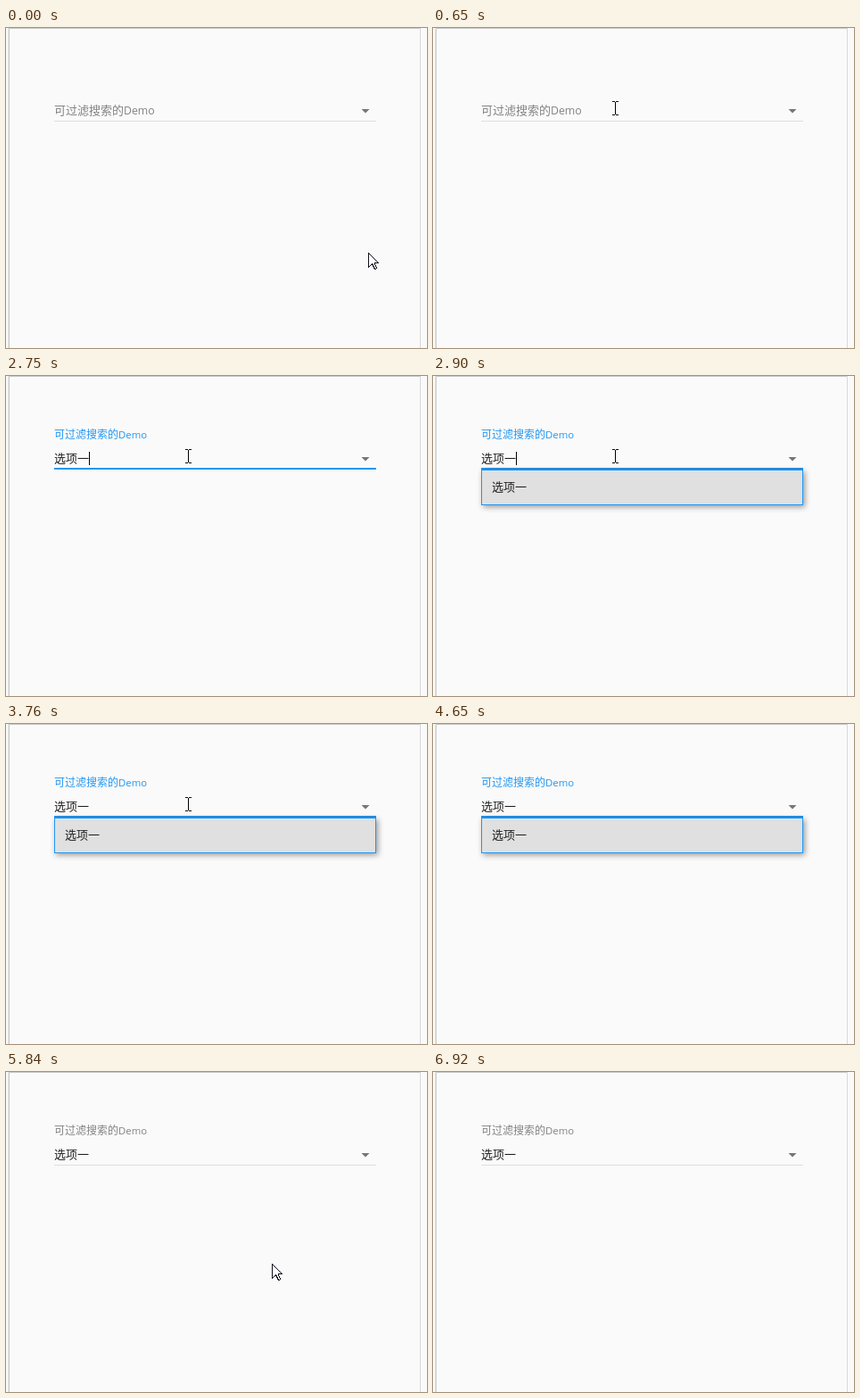
An HTML page that plays this animation: 472 by 359 pixels, repeating every 7190 ms.

```html
<!DOCTYPE html>
<html lang="zh-CN">
<head>
<meta charset="utf-8">
<title>Combobox</title>
<style>
  html, body { margin: 0; width: 100%; height: 100%; overflow: hidden; background: #fafafa; }
  svg { display: block; }
  text { font: 13px "Noto Sans CJK SC", "Noto Sans CJK", "Noto Sans", sans-serif; fill: #212121; }
  .latin { font-family: "Open Sans", "Noto Sans", sans-serif; font-size: .945em; }
  #menu { filter: drop-shadow(2px 2px 3px rgba(0, 0, 0, .4)); }
</style>
</head>
<body>
<svg width="472" height="359" viewBox="0 0 472 359">
  <rect width="472" height="359" fill="#fafafa"/>
  <path d="M2.5 0V359" stroke="#e6e6e6"/>
  <path d="M3.5 359V.5H464" fill="none" stroke="#cacaca"/>
  <path d="M464.5 0V359" stroke="#d9d9d9"/>

  <text id="label" x="54">可过滤搜索的<tspan class="latin">Demo</tspan></text>
  <text id="value" x="54" y="97">选项一</text>
  <rect id="caret" width="1" height="15" fill="#000"/>
  <path d="M398.5 91H407.5L403 95.5Z" fill="#757575"/>
  <rect x="54" y="104" width="361" height="1" fill="#dedede"/>
  <rect id="line" y="103" height="2" fill="#2196f3"/>

  <g id="menu">
    <rect x="54.5" y="105.5" width="360" height="39" fill="#e0e0e0" stroke="#2196f3"/>
    <text x="66" y="129">选项一</text>
  </g>

  <path id="beam" d="M0 .5H3M4 .5H7M3.5 1V15M0 15.5H3M4 15.5H7"
        transform="translate(201 82)" fill="none" stroke="#000"/>
  <path id="arrow" d="M.5 .5V16.5L4.5 12.5L7.5 18.5H8.5L9.5 17.5L7.5 12.5V11.5H11.5Z"
        fill="#fff" stroke="#10101c" shape-rendering="crispEdges"/>
</svg>
<script>
const LOOP = 7190, STEP = 133, BLINK = 540;
const FOCUS = 1020, TYPE = 2750, OPEN = 2900, BLUR = 5720;
const GREY = [130, 130, 130], BLUE = [33, 150, 243];
const el = id => document.getElementById(id);
const [label, value, caret, line, menu, beam, arrow] =
  ['label', 'value', 'caret', 'line', 'menu', 'beam', 'arrow'].map(el);

// Pointer strokes: a quadratic curve from a past c to b.
const strokes = [
  { t0: 0, t1: 500, a: [406, 252], c: [277, 188], b: [201, 107] },
  { t0: 4200, t1: 4500, a: [248, 138], c: [282, 137], b: [404, 304] },
  { t0: 5180, t1: 5720, a: [372, 291], c: [255, 160], b: [298, 215] },
  { t0: 5840, t1: 6500, a: [298, 215], c: [290, 202], b: [370, 121] },
  { t0: 6500, t1: 6770, a: [370, 121], c: [413, 216], b: [455, 312] }
];

const mix = (a, b, p) => a + (b - a) * p;
const within = (t, from, to) => t >= from && t < to;
const easeOut = u => 1 - (1 - u) ** 5;

// Progress from t0 to t1, held between steps like a screen recording.
function held(t, t0, t1) {
  const n = Math.round((t1 - t0) / STEP);
  const p = Math.min(1, Math.max(0, (t - t0) / (t1 - t0)));
  return Math.floor(p * n + 1e-6) / n;
}

function pointer(t) {
  const { t0, t1, a, b, c } = strokes.findLast(s => s.t0 <= t);
  const p = held(t, t0, t1);
  return a.map((v, i) => Math.round(mix(mix(v, c[i], p), mix(c[i], b[i], p), p)));
}

const show = (node, on) => node.setAttribute('opacity', +on);
const set = (node, attrs) => {
  for (const key in attrs) node.setAttribute(key, attrs[key]);
};

function draw(t) {
  const typed = t >= TYPE;
  const u = held(t, FOCUS - 135, FOCUS + 270);
  const stay = 1 - held(t, BLUR - 120, BLUR + 120);
  const float = easeOut(u * u), grow = easeOut(u) * stay;

  label.setAttribute('y', mix(97, 70, float));
  label.style.fontSize = mix(13, 12, float) + 'px';
  label.style.fill = `rgb(${GREY.map((g, i) => Math.round(mix(g, BLUE[i], float * stay)))})`;
  set(line, { x: 234.5 - 180.5 * grow, width: 361 * grow });

  // Typing restarts the blink.
  const lit = Math.floor((t - (typed ? TYPE : FOCUS - 140)) / BLINK) % 2 === 0;
  set(caret, { x: typed ? 93 : 54, y: typed ? 85 : 86 });
  show(caret, lit && within(t, FOCUS, BLUR));
  show(value, typed);
  show(menu, t >= OPEN ? stay : 0);

  show(beam, within(t, 650, 4200));
  show(arrow, t < 650 || within(t, 4200, 4650) || within(t, 5180, 6920));
  arrow.setAttribute('transform', `translate(${pointer(t)})`);
}

const start = performance.now();
function tick() {
  draw((performance.now() - start) % LOOP);
  requestAnimationFrame(tick);
}
tick();
</script>
</body>
</html>
```
